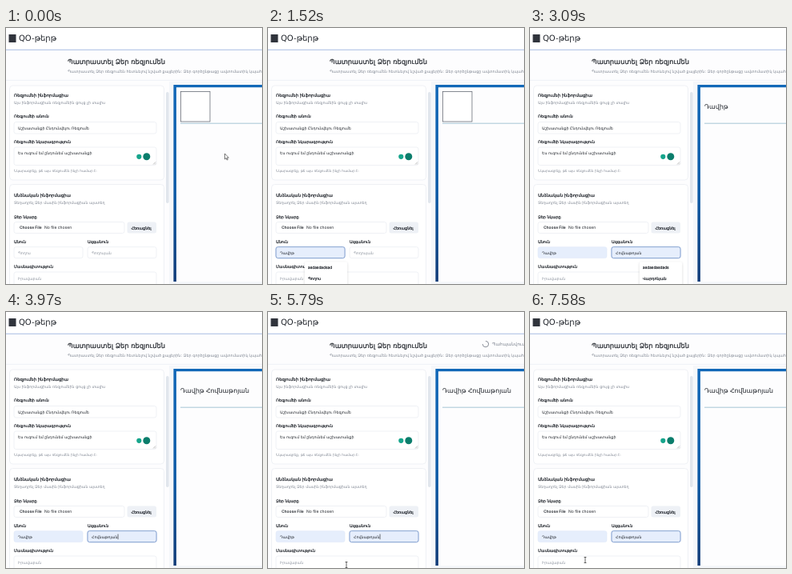
An HTML page for the animation above (7610 ms loop, 320 by 320 pixels).

```html
<!DOCTYPE html>
<html lang="hy">
<head>
<meta charset="utf-8">
<style>
  html, body { margin: 0; width: 100%; height: 100%; overflow: hidden; background: #fff; }
  svg { display: block; width: 100vw; height: 100vh; }
  text { font-family: 'DejaVu Sans', sans-serif; fill: #1c2027; text-rendering: geometricPrecision; white-space: pre; }
  .latin { font-family: Inter, 'Open Sans', sans-serif; }
  .strong { stroke: #1c2027; stroke-width: .2; }
  .muted { fill: #7f8692; }
  .hint { fill: #8d949f; }
  .box { fill: #fff; stroke: #e4e8ee; stroke-width: .6; }
</style>
</head>
<body>
<svg id="stage" viewBox="0 0 320 320" xmlns="http://www.w3.org/2000/svg">
  <defs>
    <linearGradient id="frame" x1="0" y1="0" x2="0" y2="1">
      <stop offset="0" stop-color="#1268b8"/>
      <stop offset=".55" stop-color="#0d5aa6"/>
      <stop offset="1" stop-color="#123c78"/>
    </linearGradient>
    <filter id="soft" x="-20%" y="-30%" width="140%" height="160%">
      <feDropShadow dx="0" dy="1" stdDeviation="1.5" flood-color="#334" flood-opacity=".2"/>
    </filter>
  </defs>
  <g id="page"></g>
  <g id="live"></g>
</svg>
<script>
const LOOP = 7610;
const FIRST = 'Դավիթ', LAST = 'Հովնաթոյան';
const page = document.getElementById('page');
const live = document.getElementById('live');

function add(parent, tag, attrs, content) {
  const node = document.createElementNS('http://www.w3.org/2000/svg', tag);
  for (const key in attrs) node.setAttribute(key, attrs[key]);
  if (content) node.textContent = content;
  parent.append(node);
  return node;
}
const rect = (parent, x, y, width, height, attrs) => add(parent, 'rect', { x, y, width, height, ...attrs });
const label = (parent, x, y, size, content, cls = '') =>
  add(parent, 'text', { x, y, 'font-size': size, class: cls }, content);
const line = (parent, d, stroke, width = .6) =>
  add(parent, 'path', { d, stroke, 'stroke-width': width, fill: 'none' });
const field = (x, y, w, h) => rect(page, x, y, w, h, { rx: 2.5, class: 'box' });
const show = (node, on) => node.setAttribute('visibility', on ? 'visible' : 'hidden');

// Header
rect(page, 0, 0, 320, 320, { fill: '#fdfdfe' });
rect(page, 0, 0, 320, 26.5, { fill: '#fff' });
line(page, 'M0 27.3H320', '#a9bde2', 1.1);
rect(page, 3.5, 8, 9, 10, { fill: '#30343c' });
label(page, 16, 16.3, 10, 'QO-թերթ');
label(page, 77, 45, 8.3, 'Պատրաստել Ձեր ռեզյումեն', 'strong');
label(page, 77, 55.5, 4.9, 'Պատրաստել Ձեր ռեզյումեն հետևելով նշված քայլերին: Ձեր գործընթացը ավտոմատիկ կպահպանվի', 'muted');
line(page, 'M0 65.3H320', '#e4e8f0');

// Form cards
rect(page, 4.5, 72, 193, 118, { rx: 4, class: 'box' });
rect(page, 4.5, 195.5, 193, 140, { rx: 4, class: 'box' });

label(page, 10, 86, 5.3, 'Ռեզյումեի ինֆորմացիա', 'strong');
label(page, 10, 95, 4.75, 'Այս ինֆորմացիան ռեզյումեին ցույց չի տալիս', 'muted');
label(page, 10, 112.3, 4.9, 'Ռեզյումեի անուն', 'strong');
field(10, 117.5, 178, 14.5);
label(page, 15, 126.8, 4.75, 'Աշխատանքի Ընդունվելու Ռեզյումե');
label(page, 10, 143.8, 4.9, 'Ռեզյումեի նկարագրություն', 'strong');
field(10, 149, 178, 22.5);
label(page, 15, 158, 4.75, 'Ես ուզում եմ ընդունեմ աշխատանքի');
add(page, 'circle', { cx: 166.3, cy: 160.8, r: 3.1, fill: '#16a58c' });
add(page, 'circle', { cx: 175.8, cy: 160.8, r: 4.5, fill: '#0b7d6c' });
line(page, 'M184 170.5L187 167.5M186 170.5L187 169.5', '#777', .5);
label(page, 10, 180, 4.3, 'Նկարագրեք, թե այս ռեզյումեն ինչի համար է:', 'muted');

label(page, 10, 211.3, 5.3, 'Անձնական ինֆորմացիա', 'strong');
label(page, 10, 220, 4.75, 'Տեղադրել Ձեր մասին ինֆորմացիան այստեղ', 'muted');
label(page, 10, 237.8, 4.9, 'Ձեր նկարը', 'strong');
field(10, 242.5, 138, 14);
add(page, 'text', { x: 17, y: 250.6, 'font-size': 4.9, class: 'latin', 'font-weight': 600 }, 'Choose File');
label(page, 48, 250.6, 5, 'No file chosen', 'latin');
rect(page, 151.5, 242.5, 36.5, 14, { rx: 2.5, fill: '#eef1f6' });
label(page, 156.5, 251.6, 4.9, 'Հեռացնել', 'strong');
label(page, 10, 269.2, 4.9, 'Անուն', 'strong');
label(page, 102, 269.2, 4.9, 'Ազգանուն', 'strong');
label(page, 10, 300.3, 4.9, 'Մասնագիտություն', 'strong');
field(10, 305, 178, 20);
label(page, 15, 314.8, 4.75, 'Իրավաբան', 'hint');

// Document preview
rect(page, 204, 67, 116, 253, { fill: '#f5f7fa' });
rect(page, 200, 80, 3.6, 139, { rx: 1.8, fill: '#e1e6ed' });
rect(page, 209.4, 71, 120, 246, { fill: 'url(#frame)' });
rect(page, 212.9, 74.2, 120, 242.8, { fill: '#fdfdfe' });
line(page, 'M218 119.2H320', '#8fb6cc', .8);

const photo = rect(live, 218.5, 79.5, 36.5, 37.5, { fill: '#fff', stroke: '#555b66', 'stroke-width': .7 });
const docName = label(live, 218, 101.3, 7.9, '');

// Saving indicator
const saving = add(live, 'g', {});
const arc = line(saving, 'M272 36.4A3.7 3.7 0 1 1 268.3 40.1', '#6f7580', .8);
label(saving, 280, 42.3, 5.6, 'Պահպանվում է', 'muted');

// Name inputs with an autofill list each
function nameInput(x, value, placeholder, listX, options, times) {
  const ring = rect(live, x - .5, 273.2, 87, 14.9, { rx: 3, fill: 'none', stroke: '#d3e0f6', 'stroke-width': .8 });
  const box = rect(live, x, 273.7, 86, 13.9, { rx: 2.5 });
  const content = label(live, x + 5, 282.6, 4.75, '');
  const caret = line(live, '', '#111', .6);
  const list = add(live, 'g', {});
  rect(list, listX, 292.5, 53, 40, { rx: 2, fill: '#fff', filter: 'url(#soft)' });
  options.forEach((option, i) => label(list, listX + 4, 301.3 + i * 13.5, 4.8, option, 'strong' + (i ? '' : ' latin')));

  return t => {
    const focused = t >= times.focus && t < times.blur;
    const filled = t >= times.hover;
    const accepted = t >= times.accept;
    const text = filled ? value : placeholder;
    if (content.textContent !== text) content.textContent = text;
    content.setAttribute('class', filled ? '' : 'hint');
    box.setAttribute('fill', filled ? '#e6eefc' : '#fff');
    box.setAttribute('stroke', focused ? '#7493c6' : filled ? '#dfe8f8' : '#e4e8ee');
    box.setAttribute('stroke-width', focused ? .8 : .6);
    show(ring, focused);
    show(list, focused && !accepted);
    const since = t - (accepted ? times.accept : times.focus);
    show(caret, focused && since % 1060 < 530);
    const end = x + 5.5 + (accepted ? content.getComputedTextLength() : 0);
    caret.setAttribute('d', `M${end} 277.6V284.2`);
  };
}
const inputs = [
  nameInput(10, FIRST, 'Պողոս', 46, ['asdasdadsad', 'Պողոս'],
    { focus: 740, hover: 1450, accept: 1800, blur: 2400 }),
  nameInput(102, LAST, 'Պողոսյան', 137, ['asdasdasdads', 'Վարդոնյան'],
    { focus: 2400, hover: 2950, accept: 3500, blur: LOOP })
];

// Pointer
const arrow = add(live, 'path', {
  d: 'M0 0V7L1.6 5.6L2.7 8L3.8 7.5L2.7 5.2H4.9Z', fill: '#fff', stroke: '#222', 'stroke-width': .6
});
const beam = line(live, 'M-1.4 -3.5H1.4M0 -3.5V3.5M-1.4 3.5H1.4', '#222', .7);
const path = [
  [0, 273.5, 157], [120, 273.5, 157], [680, 29, 281], [950, 29, 282], [1350, 60, 330],
  [1820, 62, 332], [2180, 126, 277], [2480, 126, 278], [2850, 155, 331], [3560, 155, 333],
  [4900, 120, 333], [5500, 98, 316], [6300, 98, 316], [7100, 69, 310], [LOOP, 69, 310]
];
function pointerAt(t) {
  const i = path.findIndex(p => p[0] > t);
  const [t0, x0, y0] = path[i - 1], [t1, x1, y1] = path[i];
  const u = (t - t0) / (t1 - t0), k = u * u * (3 - 2 * u);
  return [x0 + (x1 - x0) * k, y0 + (y1 - y0) * k];
}
function overText(x, y) {
  const inside = (left, top, right, bottom) => x > left && x < right && y > top && y < bottom;
  return inside(10, 149, 188, 171) || inside(10, 273, 96, 288) ||
    inside(102, 273, 188, 288) || inside(10, 305, 188, 325);
}

function draw(t) {
  inputs.forEach(update => update(t));
  show(photo, t < 1900);
  const name = t < 1900 ? '' : t < 3650 ? FIRST : FIRST + ' ' + LAST;
  if (docName.textContent !== name) docName.textContent = name;
  show(saving, t >= 5150 && t < 6750);
  arc.setAttribute('transform', `rotate(${(t - 5790) * .36} 272 40.1)`);

  const [x, y] = pointerAt(t);
  const text = overText(x, y);
  for (const shape of [arrow, beam]) shape.setAttribute('transform', `translate(${x} ${y})`);
  show(arrow, !text);
  show(beam, text);
}

const start = performance.now();
function tick() {
  draw((performance.now() - start) % LOOP);
  requestAnimationFrame(tick);
}
tick();
</script>
</body>
</html>
```
